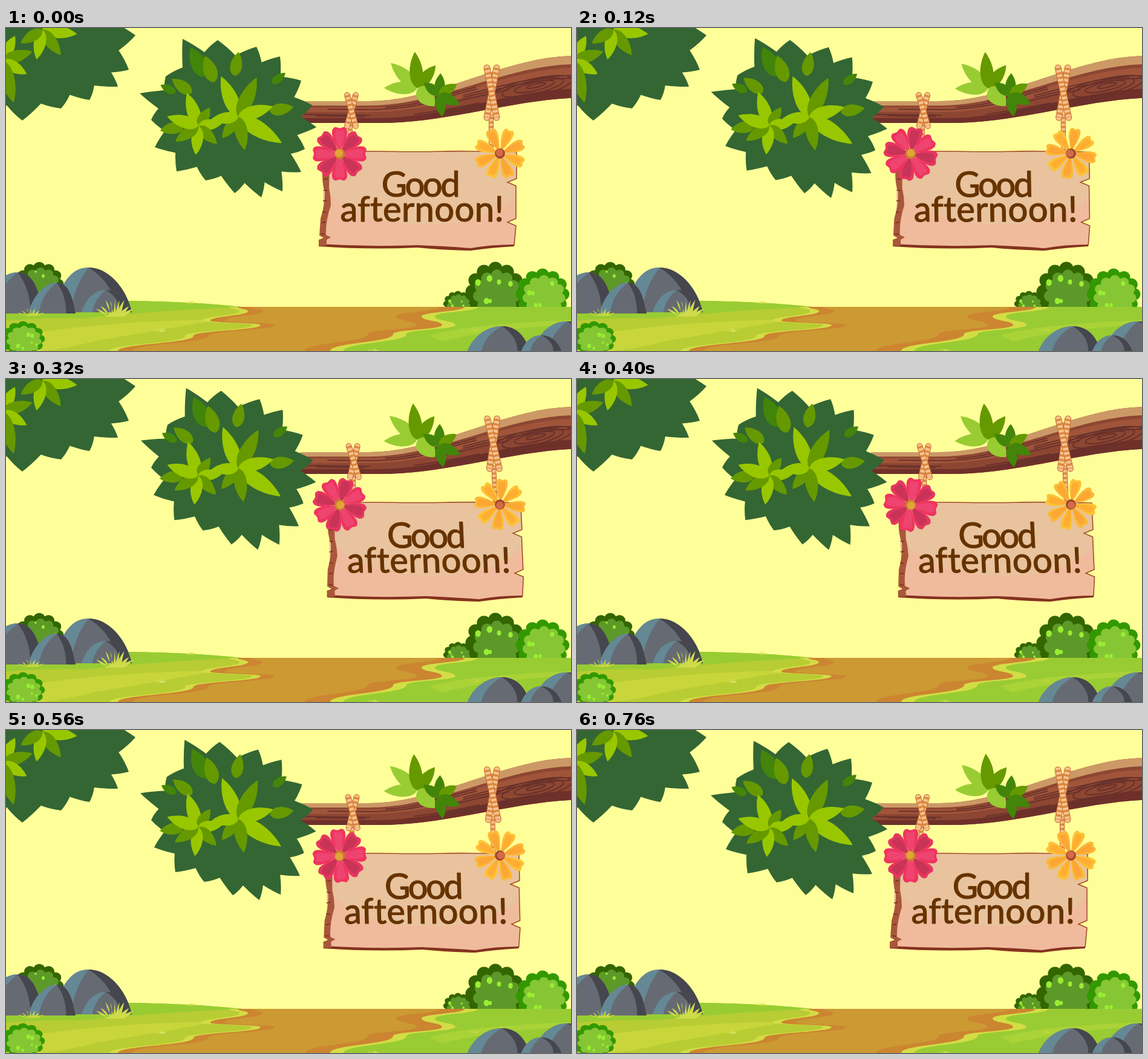
An HTML page that plays this animation: 934 px wide and 534 px high, repeating every 800 ms.

```html
<!DOCTYPE html>
<html lang="en">
<head>
<meta charset="utf-8">
<title>Good afternoon</title>
<style>
html, body { margin: 0; width: 100%; height: 100%; overflow: hidden; background: #ff9; }
svg { display: block; width: 100vw; height: 100vh; }
text { font-family: Lato, "Open Sans", sans-serif; font-size: 58px; fill: #630; stroke: #630; stroke-width: 1.2; stroke-linejoin: round; text-anchor: middle; }
</style>
</head>
<body>
<svg viewBox="0 0 934 534" preserveAspectRatio="none">
  <g id="back"></g>
  <g id="ground">
    <path fill="#b8cc33" d="M0 466L205 451Q300 452 390 461H500V534H0Z"/>
    <path fill="#9c3" d="M500 461H934V534H500ZM0 470L205 451Q300 452 390 461Q250 467 130 480Q60 478 0 484Z"/>
    <path fill="#c8d63b" d="M60 502Q190 484 350 482Q270 497 150 517Q100 530 60 534H30Z"/>
    <path fill="#aad338" d="M700 508Q760 490 934 483V490Q800 498 720 518Z"/>
  </g>
  <g id="front"></g>
  <g id="branch"></g>
  <g id="crown"></g>
  <g id="sprig"></g>
  <g id="sign">
    <g id="ropes"></g>
    <g id="board"></g>
    <text x="684" y="279" letter-spacing="-3.5">Good</text>
    <text x="688" y="320" letter-spacing=".4">afternoon!</text>
  </g>
  <g id="pink"></g>
  <g id="yellow"></g>
</svg>
<script>
const $ = id => document.getElementById(id);
const put = (id, ...parts) => $(id).insertAdjacentHTML('beforeend', parts.join(''));
const path = (d, fill) => `<path d="${d}" fill="${fill}"/>`;
const line = (d, colour, w, more = '') => `<path d="${d}" fill="none" stroke="${colour}" stroke-width="${w}" ${more}/>`;
const oval = (x, y, rx, ry, fill) => `<ellipse cx="${x}" cy="${y}" rx="${rx}" ry="${ry}" fill="${fill}"/>`;
const polar = (x, y, deg, r) => [x + r * Math.cos(deg * Math.PI / 180), y + r * Math.sin(deg * Math.PI / 180)];
const range = n => [...Array(n).keys()];
let seed = 7;
const rand = () => (seed = seed * 16807 % 2147483647) / 2147483647;

const GREEN = '#690', DEEP = '#43850a', BRIGHT = '#98c700', LIME = '#9c3';

// Pointed leaf growing from a base point.
function leaf(x, y, deg, len, w, fill) {
  const d = `M0 0C${len * .12} ${w * .65} ${len * .62} ${w * .65} ${len} 0C${len * .62} ${-w * .65} ${len * .12} ${-w * .65} 0 0Z`;
  return `<g transform="translate(${x} ${y}) rotate(${deg})">${path(d, fill)}</g>`;
}
// Leaves fanned around a point, evenly spaced.
const rosette = (x, y, first, step, lens, fills) => lens.map((len, i) =>
  leaf(x, y, first + i * step, len, 11 + len * .19, fills[i % fills.length])).join('');
// Loose leaves pointing away from a centre.
const halo = (x, y, degs, inner, len, fill) => degs.map(a =>
  leaf(...polar(x, y, a, inner), a, len, len * .5, fill)).join('');

// Ragged outline: a valley lies between each pair of tips.
function ragged(tips, cx, cy, depth) {
  const n = tips.length;
  const mix = (p, q) => [(p[0] + q[0]) / 2, (p[1] + q[1]) / 2];
  const out = ([x, y], k) => [cx + (x - cx) * k, cy + (y - cy) * k];
  const valley = i => out(mix(tips[i % n], tips[(i + 1) % n]), depth);
  const d = tips.map((t, i) => {
    const p = valley(i + n - 1), q = valley(i);
    return `Q${out(mix(p, t), 1.02)} ${t}Q${out(mix(q, t), 1.02)} ${q}`;
  });
  return path('M' + valley(n - 1) + d.join('') + 'Z', '#363');
}

function puff(x, y, rx, ry, n, fill) {
  return oval(x, y, rx * .88, ry * .88, fill) + range(n).map(i => {
    const [u, v] = polar(0, 0, i * 360 / n - 90, .77);
    return oval(x + u * rx, y + v * ry, rx * .24, ry * .24, fill);
  }).join('');
}
function bush(x, y, rx, ry, edge, fill) {
  const spots = range(6).map(() => {
    const [u, v] = polar(0, 0, rand() * 360, .3 + rand() * .4), r = (.04 + rand() * .06) * rx;
    return oval(x + u * rx, y + v * ry, r, r * 1.2, '#9e3');
  });
  return puff(x, y, rx, ry, 12, edge) + puff(x + rx * .05, y + ry * .06, rx * .8, ry * .8, 11, fill) + spots.join('');
}

// Dome with a lit left face and a shaded right face.
function rock(x, base, w, h, peak) {
  const X = k => x + w * k, Y = k => base - h * k, top = `${X(peak)} ${Y(1)}`;
  const left = `M${x} ${base}C${X(.08)} ${Y(.55)} ${X(peak - .25)} ${Y(1)} ${top}`;
  const right = `C${X(peak + .25)} ${Y(1)} ${X(.93)} ${Y(.55)} ${X(1)} ${base}`;
  return path(left + right + 'Z', '#666b73') +
    path(left + `Q${X(.27)} ${Y(.6)} ${X(.22)} ${base}Z`, '#658895') +
    path('M' + top + right + `H${X(.8)}Q${X(.8)} ${Y(.6)} ${top}Z`, '#45464e');
}
const tuft = (x, y, w, h, n, fill) => range(n).map(i => {
  const u = i / (n - 1) * 2 - 1, k = 1 - .6 * u * u - i % 2 * .12, b = x + u * w * .4;
  return path(`M${b - w * .11} ${y}Q${b} ${y - h * k * .6} ${x + u * w} ${y - h * k}Q${x + u * w * .75} ${y - h * k * .4} ${b + w * .11} ${y}Z`, fill);
}).join('');

// S-curves through the turning points of a bank.
const bend = pts => pts.slice(1).map(([x, y], i) => {
  const [px, py] = pts[i], m = (py + y) / 2;
  return `C${px} ${m} ${x} ${m} ${x} ${y}`;
}).join('');
function trail(dl, dr, fill) {
  const l = [[383, 461], [400, 468], [338, 484], [421, 491], [310, 509], [185, 534]].map(([x, y]) => [x + dl, y]);
  const r = [[536, 534], [640, 506], [721, 491], [687, 477], [758, 461]].map(([x, y]) => [x + dr, y]);
  return path(`M${l[0]}${bend(l)}L${r[0]}${bend(r)}Z`, fill);
}
put('ground', trail(-14, 22, '#d3dd45'), trail(0, 0, '#cc8530'), trail(24, -42, '#c93'));

put('back',
  ragged([[-60, -70], [150, -60], [214, 12], [203, 69], [185, 97], [138, 119], [91, 133], [27, 153], [-40, 140], [-110, 40]], 50, 15, .86),
  rosette(60, 3, -40, 47, [60, 58, 52, 50, 42], [GREEN, BRIGHT]),
  rosette(-6, 54, -63, 46, [46, 52, 46, 72], [BRIGHT, GREEN]),
  bush(55, 423, 40, 36, '#360', '#5d9928'),
  bush(809, 436, 49, 49, '#360', '#5d9928'),
  bush(747, 456, 24, 21, '#360', '#5d9928'),
  bush(887, 440, 44, 42, '#390', '#86c634'));

put('front',
  rock(-45, 472, 107, 68, .6), rock(78, 470, 130, 74, .45),
  rock(37, 472, 78, 51, .6), rock(125, 470, 80, 37, .5),
  tuft(180, 477, 31, 32, 9, '#cfdc4a'), tuft(41, 476, 22, 14, 7, '#c8d840'),
  tuft(304, 456, 10, 8, 5, '#c8d840'), tuft(256, 502, 9, 9, 5, '#e3ec73'),
  tuft(775, 501, 9, 9, 5, '#c8d840'), tuft(607, 535, 9, 8, 5, '#e3ec73'),
  bush(28, 514, 36, 29, '#390', '#86c634'),
  rock(763, 534, 103, 41, .55), rock(870, 534, 116, 49, .5), rock(852, 534, 66, 26, .5));

// The bough lies between two smooth steps; v runs from its top to its underside.
const ease = u => { u = Math.max(0, Math.min(1, u)); return u * u * (3 - 2 * u); };
function bough(x, v) {
  const top = 121 - 75 * ease((x - 600) / 340), low = 157 - 42 * ease((x - 620) / 340);
  return [x, top + (low - top) * v];
}
const grain = (x0, x1, v0, v1) => range(25).map(i => bough(x0 + (x1 - x0) * i / 24, v0 + (v1 - v0) * i / 24));
const band = (v0, v1, fill) => path('M' + grain(486, 934, v0, v0).join('L') + 'L' + grain(934, 486, v1, v1).join('L') + 'Z', fill);
put('branch',
  band(0, 1, '#8d4632'), band(0, .2, '#c96'), band(.28, .5, '#a0553a'), band(.78, 1, '#6f302a'),
  range(12).map(i => {
    const x = 490 + rand() * 300, v = .25 + i * .06;
    return line('M' + grain(x, x + 80 + rand() * 120, v, v + .04).join('L'), '#67302a', 1.8);
  }).join(''),
  range(4).map(i => `<ellipse cx="${868 + i * 3}" cy="${100 - i}" rx="${70 - i * 18}" ry="${15 - i * 4}" transform="rotate(-13 868 100)" fill="none" stroke="#67302a" stroke-width="2"/>`).join(''));

put('crown',
  ragged([[292, 18], [350, 20], [414, 31], [453, 47], [488, 87], [507, 128], [513, 164], [494, 200], [488, 238], [457, 270], [422, 280], [378, 273], [330, 252], [282, 237], [246, 197], [240, 152], [221, 108], [264, 80]], 365, 150, .84),
  halo(365, 150, [170, 216, 280, 350], 72, 40, GREEN),
  halo(365, 150, [207, 322], 95, 28, DEEP),
  halo(365, 150, [243], 78, 54, DEEP), halo(365, 150, [251], 64, 46, GREEN),
  rosette(318, 162, -109, 51, [58, 36, 40, 43, 48, 46, 54], [BRIGHT, GREEN, BRIGHT, GREEN, BRIGHT, GREEN, BRIGHT]),
  rosette(384, 147, -113, 48, [73, 72, 60, 84, 56, 44, 45], [BRIGHT, GREEN, BRIGHT, BRIGHT, GREEN, GREEN, BRIGHT]));

put('sprig',
  rosette(680, 99, 180, 43, [55, 60, 60, 48], [LIME, LIME, GREEN, GREEN]),
  leaf(682, 98, 50, 41, 29, LIME),
  rosette(716, 110, -142, 56, [32, 35, 34, 38, 37], [DEEP, DEEP, GREEN]));

function rope(x1, y1, x2, y2, w) {
  const d = `M${x1} ${y1}L${x2} ${y2}`, round = 'stroke-linecap="round"';
  return line(d, '#c4662c', w, round) + line(d, '#f6c48f', w - 2, round) + line(d, '#dd8840', w - 2, 'stroke-dasharray="3.5 4"');
}
const knot = (x, y, w, h, t) => rope(x + w, y, x - w, y + h, t) + rope(x - w, y, x + w, y + h, t);
put('ropes',
  rope(569, 159, 568, 207, 8), knot(571, 111, 7, 51, 10),
  rope(802, 147, 802, 207, 8), knot(803, 66, 8, 82, 11));

const notch = y => `V${y - 6}L829 ${y}L843 ${y + 6}`;
const rim = `M525 207Q570 203 625 204T720 204T844 205${notch(255)}${notch(321)}L840 359`;
put('board',
  path(rim + 'Q805 359 770 364Q715 362 680 360Q600 364 524 358Z', '#f0bb9d'),
  path(`M527 207Q570 203 625 204T720 204T844 205${notch(255)}V276Q805 324 690 325Q580 322 536 275Z`, '#e8c39d'),
  line(rim, '#a34d2a', 1.6),
  path('M517 357Q600 362 680 359Q730 361 768 364Q800 358 840 358V361Q803 363 768 368Q720 367 680 363Q600 367 517 361Z', '#85321f'),
  path('M524 225Q521 255 527 270Q528 290 520 315L518 343L525 347L517 350V360H530V350L537 346L529 342Q528 320 537 293Q537 278 534 264L535 225Z', '#a9573a'),
  range(6).map(i => line(`M${526 - i} ${250 + i * 18}l6 ${i % 2 ? 1 : -1}`, '#6f2d1c', 1.5)).join(''));

// Eight notched petals in two alternating colour pairs.
function flower(id, w, r, pairs, core, glow) {
  const petal = (k, q) => `M0 0C${-k * .4} ${-q * .33} ${-k * 1.25} ${-q * .6} ${-k} ${-q * .87}Q${-k * .7} ${-q} ${-k * .4} ${-q * .95}L0 ${-q * .92}L${k * .4} ${-q * .95}Q${k * .7} ${-q} ${k} ${-q * .87}C${k * 1.25} ${-q * .6} ${k * .4} ${-q * .33} 0 0Z`;
  put(id, range(8).map(i =>
    `<g transform="rotate(${i * 45})">${path(petal(w, r), pairs[i % 2][0])}${path(petal(w * .6, r * .9), pairs[i % 2][1])}</g>`).join(''),
    oval(0, 0, r * .19, r * .19, core), oval(-1, -1, r * .14, r * .14, glow));
}
flower('pink', 12, 46, [['#f0335f', '#ee4470'], ['#e6365f', '#c93357']], '#c98028', '#e2a43a');
flower('yellow', 9, 44, [['#fdc233', '#ffae33'], ['#fbb935', '#fca635']], '#9b492e', '#d46a46');

function draw(ms) {
  const step = Math.floor(ms % 800 / 40);
  const sway = step <= 9 ? step / 9 : (19 - step) / 10;
  const k = sway * .05, turn = step / 19 * 360;
  const set = (id, v) => $(id).setAttribute('transform', v);
  set('crown', `rotate(${sway * 2.8} 365 150)`);
  set('sprig', `rotate(${-sway * 2.8} 705 110)`);
  set('sign', `matrix(1 0 ${k} 1 ${-50 * k} 0)`);
  set('pink', `translate(551.5 208) rotate(${turn})`);
  set('yellow', `translate(816.5 207.5) rotate(${22.5 - turn})`);
}
const start = performance.now();
function tick() {
  draw(performance.now() - start);
  requestAnimationFrame(tick);
}
draw(0);
requestAnimationFrame(tick);
</script>
</body>
</html>
```
